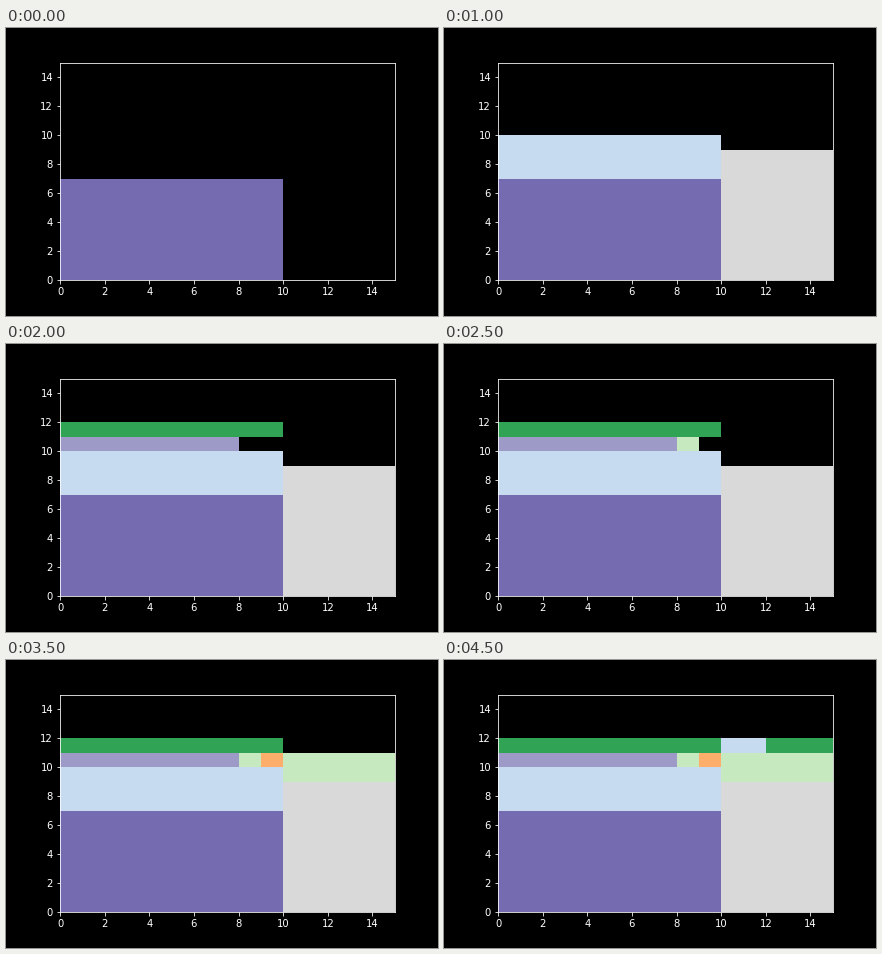
These frames come from a looping animation (432 px wide and 288 px high, 5000 ms). A matplotlib script:

```python
import matplotlib.pyplot as plt
from matplotlib.animation import FuncAnimation
from matplotlib.patches import Rectangle

plt.rcParams.update({
    "font.family": "DejaVu Sans",
    "font.size": 10,
    "figure.facecolor": "black",
    "savefig.facecolor": "black",
    "axes.facecolor": "black",
    "axes.edgecolor": "white",
    "xtick.color": "white",
    "ytick.color": "white",
})

SIZE = 15
STEP_MS = 500

PURPLE, LILAC = "#756bb1", "#9e9ac8"
BLUE, GRAY = "#c6dbef", "#d9d9d9"
GREEN, MINT = "#31a354", "#c7e9c0"
ORANGE = "#fdae6b"

# x, y, width, height, colour, in order of placement
BLOCKS = [
    (0, 0, 10, 7, PURPLE),
    (0, 7, 10, 3, BLUE),
    (10, 0, 5, 9, GRAY),
    (0, 10, 8, 1, LILAC),
    (0, 11, 10, 1, GREEN),
    (8, 10, 1, 1, MINT),
    (9, 10, 1, 1, ORANGE),
    (10, 9, 5, 2, MINT),
    (10, 11, 2, 1, BLUE),
    (12, 11, 3, 1, GREEN),
]

fig, ax = plt.subplots(figsize=(6, 4), dpi=72)
fig.subplots_adjust(left=0.125, right=0.9, bottom=0.125, top=0.88)
ax.set(xlim=(0, SIZE), ylim=(0, SIZE),
       xticks=range(0, SIZE, 2), yticks=range(0, SIZE, 2))

patches = [
    ax.add_patch(Rectangle((x, y), w, h, facecolor=color, linewidth=0))
    for x, y, w, h, color in BLOCKS
]


def update(step):
    for i, patch in enumerate(patches):
        patch.set_visible(i <= step)
    return patches


anim = FuncAnimation(fig, update, frames=len(BLOCKS), interval=STEP_MS,
                     repeat=True, repeat_delay=0, blit=False)
plt.show()
```
